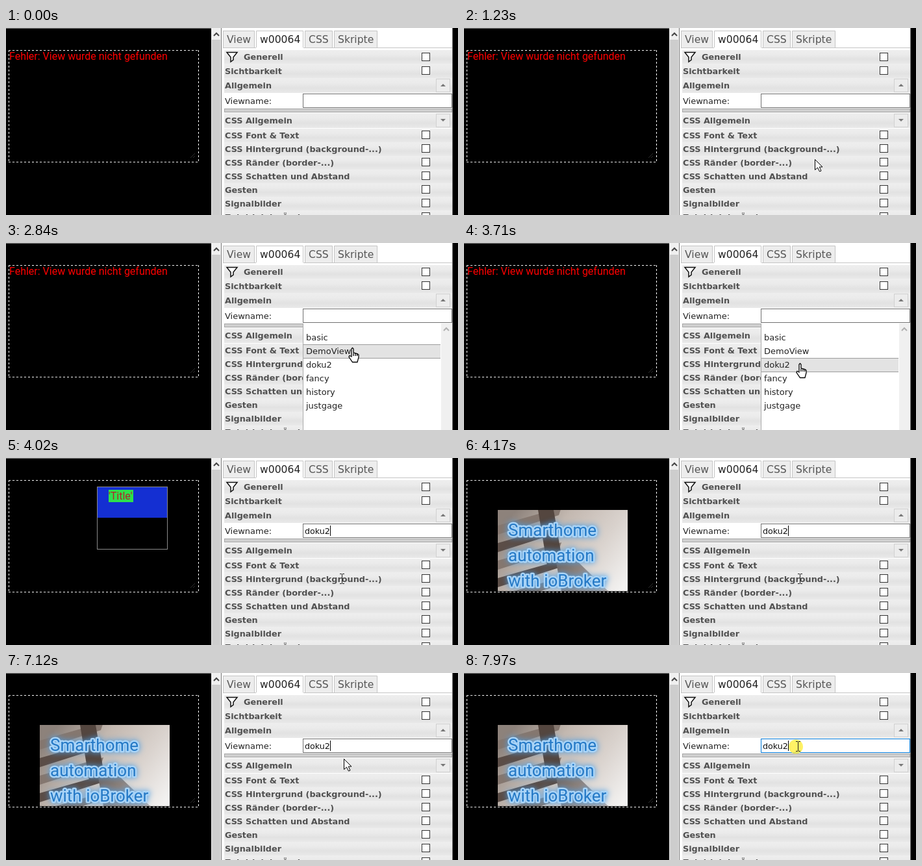
An HTML page with a canvas for the animation above (8 s loop, 696 px wide and 288 px high).

```html
<!DOCTYPE html>
<html lang="de">
<head>
<meta charset="utf-8">
<title>View in Widget</title>
<style>
  html, body { margin: 0; width: 100%; height: 100%; overflow: hidden; background: #000; }
  canvas { display: block; width: 696px; height: 288px; }
</style>
</head>
<body>
<canvas id="stage" width="696" height="288"></canvas>
<script>
const ctx = document.getElementById('stage').getContext('2d');
const LOOP = 8000, STEP = 76, ROW = 21;
const UI = '"DejaVu Sans", sans-serif';
const BODY = 'Roboto, sans-serif';
const VIEWS = ['basic', 'DemoView', 'doku2', 'fancy', 'history', 'justgage'];
const SECTIONS = ['CSS Font & Text', 'CSS Hintergrund (background-...)', 'CSS Ränder (border-...)',
  'CSS Schatten und Abstand', 'Gesten', 'Signalbilder', 'Zeigt letzte Änd.'];

// Each pointer move starts where the previous one ended.
const ENTRY = { x: 549, y: 300 };
const MOVES = [
  { start: 1070, steps: 9, x: 531, y: 114, bow: 0 },
  { start: 2610, steps: 9, x: 517, y: 186, bow: 11 },
  { start: 6570, steps: 11, x: 517, y: 127, bow: 4 },
  { start: 7425, steps: 8, x: 514, y: 113, bow: 0 }
];

const easeOut = f => 1 - (1 - f) ** 1.85;
const blink = (t, start, period) => t >= start && Math.floor((t - start) / period) % 2 === 0;

function rect(x, y, w, h, color) {
  ctx.fillStyle = color;
  ctx.fillRect(x, y, w, h);
}

function frame(x, y, w, h, color) {
  ctx.strokeStyle = color;
  ctx.lineWidth = 1;
  ctx.strokeRect(x + .5, y + .5, w - 1, h - 1);
}

function text(str, x, y, font, color) {
  ctx.font = font;
  ctx.fillStyle = color;
  ctx.fillText(str, x, y);
}

function poly(points, fill, stroke, width = 1) {
  ctx.beginPath();
  points.forEach(([x, y]) => ctx.lineTo(x, y));
  ctx.closePath();
  if (fill) { ctx.fillStyle = fill; ctx.fill(); }
  if (stroke) { ctx.strokeStyle = stroke; ctx.lineWidth = width; ctx.stroke(); }
}

function line(color, width, ...points) {
  ctx.strokeStyle = color;
  ctx.lineWidth = width;
  ctx.beginPath();
  points.forEach(([x, y], i) => i ? ctx.lineTo(x, y) : ctx.moveTo(x, y));
  ctx.stroke();
}

function chevron(x, y, color) {
  line(color, 2, [x - 4, y + 2], [x, y - 2], [x + 4, y + 2]);
}

function gradient(x0, y0, x1, y1, ...colors) {
  const g = ctx.createLinearGradient(x0, y0, x1, y1);
  colors.forEach((c, i) => g.addColorStop(i / (colors.length - 1), c));
  return g;
}

function header(label, y, h, x = 337) {
  rect(336, y, 351, h, gradient(0, y, 0, y + h, '#eeeeee', '#ebebeb', '#e2e2e2', '#e9e9e9'));
  text(label, x, Math.floor(y + h / 2 + 4.5), 'bold 12.8px ' + UI, '#505050');
}

function checkbox(y) {
  rect(640, y, 13, 13, '#fff');
  frame(640, y, 13, 13, '#333');
}

function toggle(y, dir) {
  rect(662, y, 22, 21, '#ececec');
  frame(662, y, 22, 21, '#d0d0d0');
  const cy = y + 10;
  poly([[669, cy - 2 * dir], [677, cy - 2 * dir], [673, cy + 2 * dir]], '#777');
}

function tab(label, x, w, active) {
  rect(x, 4, w, active ? 27 : 26, active ? '#fff' : '#ededed');
  line('#c4c4c4', 1, [x + .5, 30], [x + .5, 4.5], [x + w - .5, 4.5], [x + w - .5, 30]);
  text(label, x + 6, 23, '15.6px ' + UI, active ? '#222' : '#555');
}

function panel() {
  rect(316, 0, 15, 288, '#f0f0f0');
  rect(317, 18, 13, 270, '#cdcdcd');
  chevron(324, 10, '#444');
  rect(331, 0, 1, 288, '#777');
  rect(332, 0, 355, 288, '#fff');
  rect(687, 0, 1, 288, '#777');
  rect(334, 30, 353, 1, '#c4c4c4');
  tab('View', 334, 49);
  tab('w00064', 385, 73, true);
  tab('CSS', 460, 43);
  tab('Skripte', 505, 67);

  header('Generell', 34, 21, 366);
  header('Sichtbarkeit', 55, 23);
  header('Allgemein', 77, 23);
  checkbox(38);
  checkbox(59);
  toggle(78, -1);
  poly([[340, 37.5], [356, 37.5], [350, 45], [350, 49], [346, 52], [346, 45]], '#fff', '#111', 1.5);

  text('Viewname:', 337, 117, '13px ' + UI, '#222');
  rect(336, 124, 351, 6, '#cfcfcf');
  frame(336, 124, 351, 6, '#a6a6a6');

  header('CSS Allgemein', 131, 23);
  toggle(132, 1);
  SECTIONS.forEach((label, i) => {
    header(label, 155 + i * ROW, ROW);
    checkbox(158 + i * ROW);
  });
}

// Soft picture of a glass front: slanted window bands, a dark pillar, bright sky.
function photo() {
  ctx.save();
  ctx.beginPath();
  ctx.rect(52, 80, 200, 125);
  ctx.clip();
  rect(52, 80, 200, 125, gradient(80, 80, 240, 205, '#8d827b', '#c3b8b0', '#d9d2cd', '#f3f2f1'));
  for (let i = 0; i < 5; i++) {
    const y = 88 + i * 27;
    poly([[52, y + 16], [150, y - 12], [146, y], [52, y + 30]], i % 2 ? '#5b4d47' : '#85776f');
  }
  poly([[114, 80], [138, 80], [150, 150], [128, 165]], '#54463f');
  poly([[140, 150], [160, 145], [222, 205], [150, 205]],
    gradient(140, 150, 215, 205, '#6b5d56', '#b7aeaa'));

  ctx.lineJoin = 'round';
  ['Smarthome', 'automation', 'with ioBroker'].forEach((words, i) => {
    const y = 120 + i * 39;
    ctx.font = '26px ' + BODY;
    ctx.save();
    ctx.shadowColor = '#4c9fe6';
    ctx.shadowBlur = 10;
    ctx.strokeStyle = '#a9d4f7';
    ctx.lineWidth = 5;
    ctx.strokeText(words, 68, y);
    ctx.restore();
    text(words, 68, y, ctx.font, '#2579c6');
  });
  ctx.restore();
}

function preview(t) {
  rect(0, 0, 316, 1, '#777');
  if (t < 4020) {
    text('Fehler: View wurde nicht gefunden', 5, 49, '16px ' + BODY, '#f00');
  } else if (t < 4090) {
    rect(140, 44, 109, 48, '#142fd2');
    frame(140, 44, 109, 97, '#8a8a8a');
    rect(158, 49, 38, 19, '#2ee04c');
    text("'Title'", 158, 64, '16px ' + BODY, '#b5202a');
  } else {
    photo();
  }
  ctx.setLineDash([3, 3]);
  [34.5, 206.5].forEach(y => line('#fff', 1, [4, y], [297, y]));
  [4.5, 296.5].forEach(x => line('#fff', 1, [x, 34], [x, 207]));
  ctx.setLineDash([]);
  [0, 4].forEach(d => line('#2b2b2b', 1, [284 + d, 200], [291, 193 + d]));
}

function field(t, hover, clicked) {
  rect(457, 101, 230, 22, '#fff');
  frame(457, 101, 230, 22, hover ? '#0078d7' : '#707070');
  const filled = t >= 3940;
  if (filled) text('doku2', 460, 117, '12.7px ' + UI, '#111');
  const caret = filled ? blink(t, 3635, 538) || clicked : blink(t, 2120, 530);
  if (caret) rect(filled ? 499 : 460, 104, 1, 16, '#000');
}

function dropdown(p) {
  rect(457, 124, 230, 164, '#fff');
  rect(457, 124, 1, 164, '#aaa');
  rect(670, 124, 17, 164, '#f0f0f0');
  chevron(678, 133, '#b0b0b0');
  const over = Math.floor((p.y - 135) / ROW);
  VIEWS.forEach((name, i) => {
    const y = 135 + i * ROW;
    if (i === over) {
      rect(458, y, 211, 22, '#9d9d9d');
      rect(458, y + 1, 211, 20, '#e3e3e3');
    }
    text(name, 462, y + 15, '13px ' + UI, '#222');
  });
}

function pointerAt(t) {
  let p = null;
  for (const m of MOVES) {
    if (t < m.start) break;
    const from = p || ENTRY;
    const f = Math.min(1, (Math.floor((t - m.start) / STEP) + 1) / m.steps);
    const e = easeOut(f);
    p = {
      x: Math.round(from.x + (m.x - from.x) * e + m.bow * Math.sin(Math.PI * f)),
      y: Math.round(from.y + (m.y - from.y) * e)
    };
  }
  return p;
}

function beam(x, y) {
  rect(x, y - 7, 1, 14, '#222');
  [-8, 7].forEach(d => {
    rect(x - 3, y + d, 3, 1, '#222');
    rect(x + 1, y + d, 3, 1, '#222');
  });
}

function arrow(x, y) {
  ctx.save();
  ctx.translate(x + .5, y + .5);
  poly([[0, 0], [0, 16], [4, 12.5], [7, 18.5], [9.5, 17.5], [6.8, 11.5], [11.5, 11.5]], '#fff', '#000');
  ctx.restore();
}

function hand(x, y) {
  ctx.save();
  ctx.translate(x - 6, y - 1);
  poly([[5, 14], [5, 2], [6.5, .5], [8, 2], [8, 8], [14, 9.5], [16, 11], [16, 15],
    [14, 22.5], [6.5, 22.5], [1, 14.5], [2, 12.3]], '#fff', '#000', 1.3);
  [8, 11, 13.7].forEach(a => line('#000', 1.3, [a, 9], [a, 13]));
  ctx.restore();
}

function draw(t) {
  const p = pointerAt(t);
  const open = t >= 2070 && t < 3940;
  const inField = !!p && p.y <= 124;
  const clicked = [[1840, 2070], [3860, 3940], [7890, LOOP]].some(([a, b]) => t >= a && t < b);
  rect(0, 0, 696, 288, '#000');
  preview(t);
  panel();
  field(t, inField, clicked);
  if (open) dropdown(p);
  if (!p) return;
  if (clicked) {
    ctx.beginPath();
    ctx.arc(p.x - 3, p.y + .5, 11, 0, 7);
    ctx.fillStyle = 'rgba(255, 238, 50, .75)';
    ctx.fill();
  }
  const onLabel = p.y > 178 && p.y < 195 && p.x < 581;
  if (open && !inField) hand(p.x, p.y);
  else if (inField || onLabel) beam(p.x, p.y);
  else arrow(p.x, p.y);
}

function tick() {
  draw(performance.now() % LOOP);
  requestAnimationFrame(tick);
}
tick();
</script>
</body>
</html>
```
